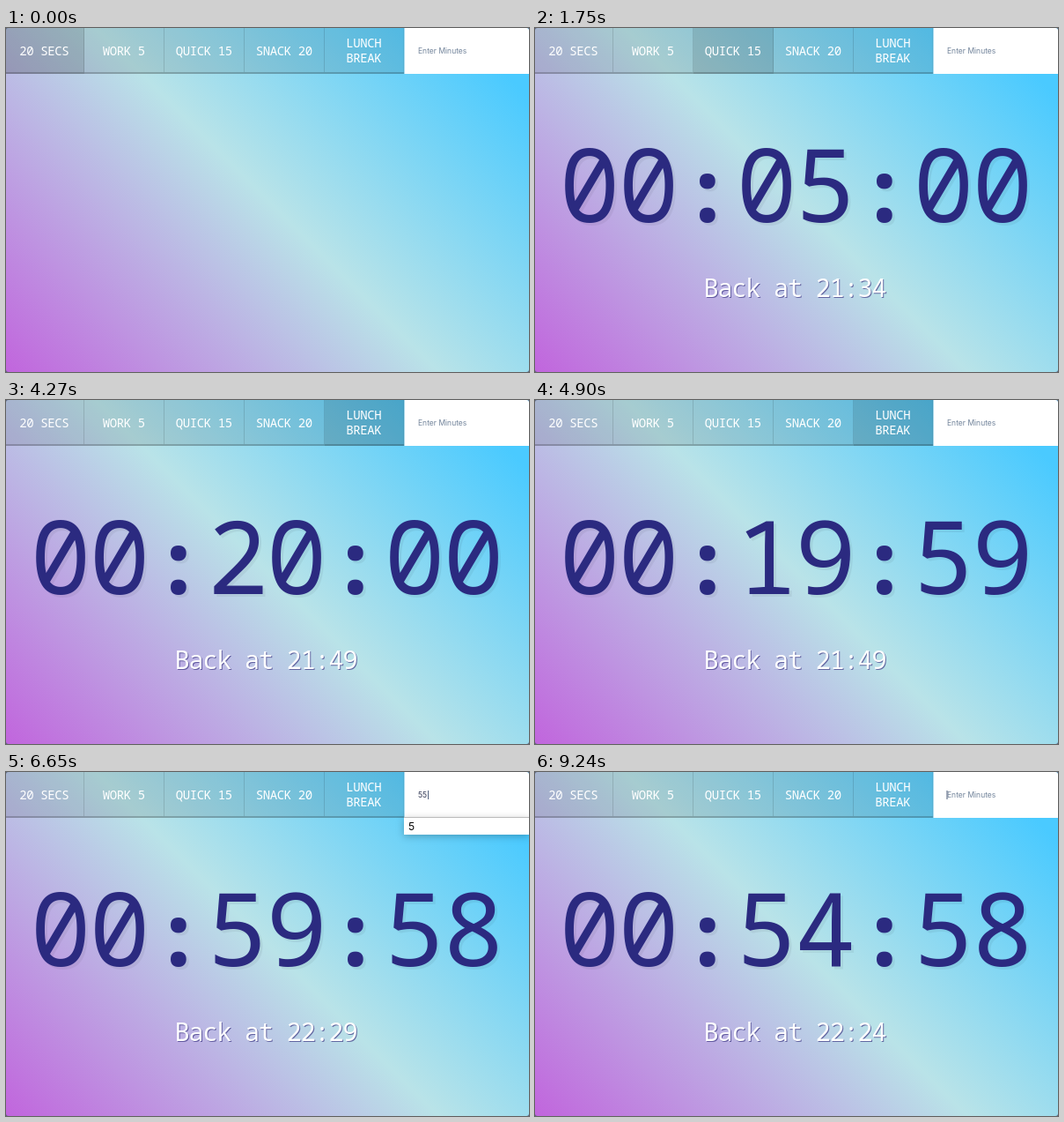
An HTML page that plays this animation: 594x390 px, repeating every 9.31 s.

```html
<!DOCTYPE html>
<html lang="en">
<head>
<meta charset="utf-8">
<title>Countdown timer</title>
<style>
  html, body { margin: 0; width: 100%; height: 100%; overflow: hidden; background: #5b6480; }
  svg {
    display: block; width: 594px; height: 390px; border-radius: 3px;
    background: linear-gradient(45deg, #c165dd, #b9e3e8 50%, #4acaff 92%);
  }
  text { font-family: "Noto Sans Mono", monospace; white-space: pre; }
  .label { font-size: 14px; letter-spacing: -.4px; fill: #fff; text-anchor: middle; }
  .clock { font-size: 116px; font-weight: 340; fill: #2b2a80; text-anchor: middle; filter: drop-shadow(3px 3px 0 rgba(0,0,0,.05)); }
  .colon { font-size: 98px; font-weight: 600; }
  .back { font-size: 28.5px; letter-spacing: -1.2px; fill: #fff; filter: drop-shadow(1px 1.5px 0 rgba(50,45,125,.65)); }
  .field { font: 8.5px Inter, sans-serif; }
  .menu { filter: drop-shadow(0 2px 4px rgba(0,0,0,.25)); }
  .menu text { font: 12px Inter, sans-serif; }
</style>
</head>
<body>
<svg viewBox="0 0 594 390">
  <g id="buttons"></g>
  <rect x="452.5" width="141.5" height="52" fill="#fff"/>
  <text id="field" class="field" x="468" y="29"></text>
  <rect id="caret" y="21" width="1" height="10" fill="#4a5a78"/>
  <g id="menu" class="menu">
    <rect x="452" y="51" width="142" height="20" fill="#fff"/>
    <path d="M452 51.5h142" stroke="#bbb"/>
    <text x="457" y="66">5</text>
  </g>
  <text id="clock" class="clock" y="219.5"></text>
  <text id="back" class="back" x="191.6" y="304.5"></text>
</svg>
<script>
const LOOP = 9310, TICK = 700, FADE = 140;
const FOCUS = 5530, KEYS = [6370, 6580], MENU_END = 6720, ENTER = 7770;

// start time, seconds on the clock, time of return
const countdowns = [
  [70, 20, '21:29'], [1120, 300, '21:34'], [1820, 900, '21:44'],
  [3640, 1200, '21:49'], [5110, 3600, '22:29'], [ENTER, 3300, '22:24']
];
// label lines, left edge, hover start and end
const buttons = [
  [['20 SECS'], 0, -500, 700],
  [['WORK 5'], 89, 700, 1470],
  [['QUICK 15'], 180, 1470, 2800],
  [['SNACK 20'], 271, 2800, 3990],
  [['LUNCH', 'BREAK'], 362, 3990, 5300]
];

const $ = id => document.getElementById(id);
const clamp = v => Math.max(0, Math.min(1, v));
const pad = n => String(n).padStart(2, '0');
const format = s => [s / 3600, s / 60 % 60, s % 60].map(n => pad(Math.floor(n)))
  .join('<tspan class="colon">:</tspan>');
const show = (id, on) => $(id).setAttribute('visibility', on ? 'visible' : 'hidden');

$('buttons').innerHTML = buttons.map(([lines, x], i) => {
  const right = i < 4 ? buttons[i + 1][1] : 452.5;
  const center = [43.5, 134, 225, 316, 406.5][i] - .2;
  const labels = lines.map((line, n) =>
    `<text class="label" x="${center}" y="${lines.length > 1 ? 22 + 17 * n : 31}">${line}</text>`);
  return `<rect class="cell" x="${x}" width="${right - x}" height="52"/>
    <path d="M${right - .5} 0V50" stroke="#000" stroke-opacity=".12"/>
    <path d="M${x} 51H${right}" stroke="#000" stroke-opacity=".2" stroke-width="2"/>${labels.join('')}`;
}).join('');
const cells = document.querySelectorAll('.cell');

// one centre per clock character
$('clock').setAttribute('x', Array.from({ length: 8 }, (_, i) => 62 + 67 * i).join(' '));

function draw(t) {
  buttons.forEach(([, , from, to], i) => {
    const hover = clamp((t - from) / FADE) - clamp((t - to) / FADE);
    cells[i].setAttribute('fill-opacity', .1 + .1 * hover);
  });

  const current = countdowns.filter(([at]) => t >= at).pop();
  $('clock').innerHTML = current ? format(current[1] - Math.floor((t - current[0]) / TICK)) : '';
  $('back').textContent = current ? 'Back at ' + current[2] : '';

  const typed = t < ENTER ? '5'.repeat(KEYS.filter(k => t >= k).length) : '';
  $('field').textContent = typed || 'Enter Minutes';
  $('field').setAttribute('fill', typed ? '#2c3350' : '#71839a');
  show('menu', t >= KEYS[0] && t < MENU_END);

  const lastInput = [FOCUS, ...KEYS, ENTER].filter(k => t >= k).pop();
  $('caret').setAttribute('x', 467.5 + 5.8 * typed.length);
  show('caret', lastInput && (t - lastInput) % TICK < TICK / 2);
}

let start;
function frame(now) {
  start ??= now;
  draw((now - start) % LOOP);
  requestAnimationFrame(frame);
}
draw(0);
requestAnimationFrame(frame);
</script>
</body>
</html>
```
